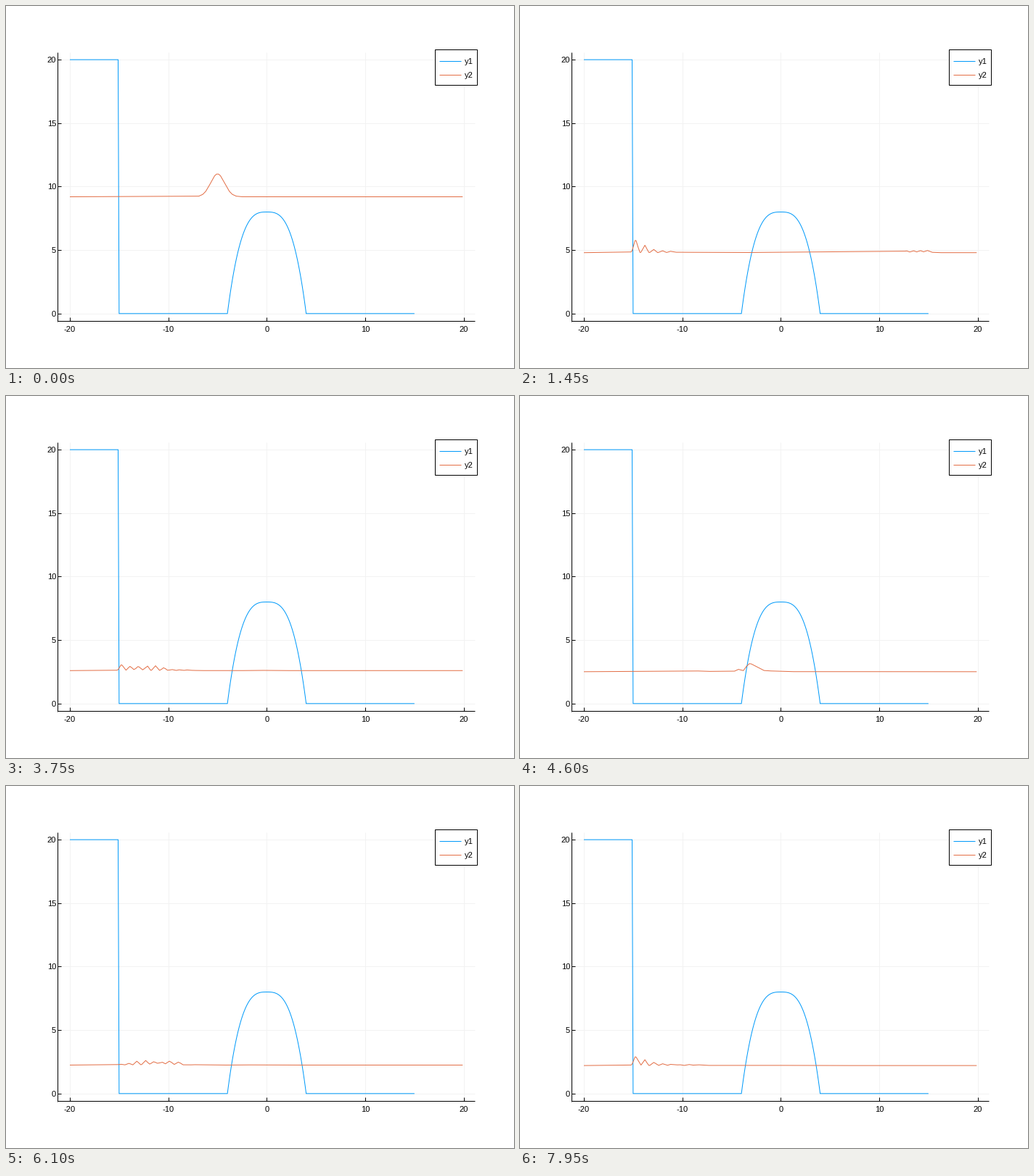
Write a matplotlib script that moves like this. It is 700 px wide and 500 px high and loops after 8 s.

```python
import numpy as np
import matplotlib.pyplot as plt
from matplotlib.animation import FuncAnimation
from matplotlib.patches import Rectangle

W, H, DPI = 700, 500, 100
FRAMES, INTERVAL = 160, 50
PX = 72 / DPI  # one pixel in points
BLUE, ORANGE = "#009AFA", "#E36F47"

plt.rcParams.update({
    "font.family": "Liberation Sans",
    "font.size": 8,
    "path.simplify": True,
    "path.simplify_threshold": 1.0,
})

# Wave packet between a wall and a bump, absorbed on the far right
N, DX = 400, 0.1
T_FRAME, SUBSTEPS = 0.202, 40
K0, ABSORB, DENSITY_SCALE = 4.2, 10.0, 3.2

x = (np.arange(N) - 200) / 10
wall = np.where(x < -15, 20.0, 0.0)
bump = np.maximum(8 - np.abs(x) ** 3 / 8, 0)
potential = wall + bump
kinetic = (2 * np.pi * np.fft.fftfreq(N, DX)) ** 2 / 2


def energy(psi):
    h_psi = np.fft.ifft(kinetic * np.fft.fft(psi)) + potential * psi
    return np.vdot(psi, h_psi).real * DX


def simulate():
    dt = T_FRAME / SUBSTEPS
    damped = potential - 1j * ABSORB * (x > 15)
    half_v = np.exp(-0.5j * dt * damped)
    full_t = np.exp(-1j * dt * kinetic)
    psi = np.exp(-(x + 5) ** 2 / 2 + 1j * K0 * x) / np.pi ** 0.25
    curves = []
    for _ in range(FRAMES):
        curves.append(energy(psi) + DENSITY_SCALE * np.abs(psi) ** 2)
        for _ in range(SUBSTEPS):
            psi = half_v * np.fft.ifft(full_t * np.fft.fft(half_v * psi))
    return curves


def to_x(v):
    return 359.35 + 13.566 * np.asarray(v)


def to_y(v):
    return 424.83 - 17.535 * np.asarray(v)


curves = simulate()

fig = plt.figure(figsize=(W / DPI, H / DPI), dpi=DPI, facecolor="white")
ax = fig.add_axes([0, 0, 1, 1])
ax.set_xlim(0, W)
ax.set_ylim(H, 0)
ax.axis("off")

LEFT, RIGHT, TOP, BOTTOM = 71, 646, 64, 435


def stroke(xs, ys, color="black", z=2):
    line, = ax.plot(xs, ys, color=color, lw=PX, zorder=z,
                    solid_capstyle="butt", solid_joinstyle="round")
    return line


def label(px, baseline, text, ha, z=3):
    ax.text(px, baseline, text, ha=ha, va="baseline", color="black", zorder=z)


# Grid, ticks and axes
for v in range(-20, 21, 10):
    gx = float(to_x(v))
    stroke([gx, gx], [TOP, BOTTOM], "#f2f2f2", z=1)
    stroke([gx, gx], [BOTTOM, BOTTOM - 5])
    label(gx, 450, str(v), "center")
for v in range(0, 21, 5):
    gy = float(to_y(v))
    stroke([LEFT, RIGHT], [gy, gy], "#f2f2f2", z=1)
    stroke([LEFT, LEFT + 5], [gy, gy])
    label(69, gy + 4, str(v), "right")
stroke([LEFT, LEFT], [TOP, BOTTOM + 1])
stroke([LEFT, RIGHT], [BOTTOM, BOTTOM])

# Potential by its corners and the curved bump, then the wave
outline = (bump > 0) | np.isin(x, [-20, -15.1, -15, -4, 4, 15])
stroke(to_x(x[outline]), to_y(potential[outline]), BLUE, z=4)
wave = stroke(to_x(x), to_y(curves[0]), ORANGE, z=5)

# Legend
ax.add_patch(Rectangle((591, 60), 58, 49, facecolor="white",
                       edgecolor="black", lw=PX, zorder=6))
for row, name, color in ((76, "y1", BLUE), (95, "y2", ORANGE)):
    stroke([597, 627], [row, row], color, z=7)
    label(632, row + 4, name, "left", z=7)


def update(i):
    wave.set_ydata(to_y(curves[i % FRAMES]))
    return wave,


anim = FuncAnimation(fig, update, frames=FRAMES, interval=INTERVAL,
                     repeat=True, repeat_delay=0, blit=False)
plt.show()
```
